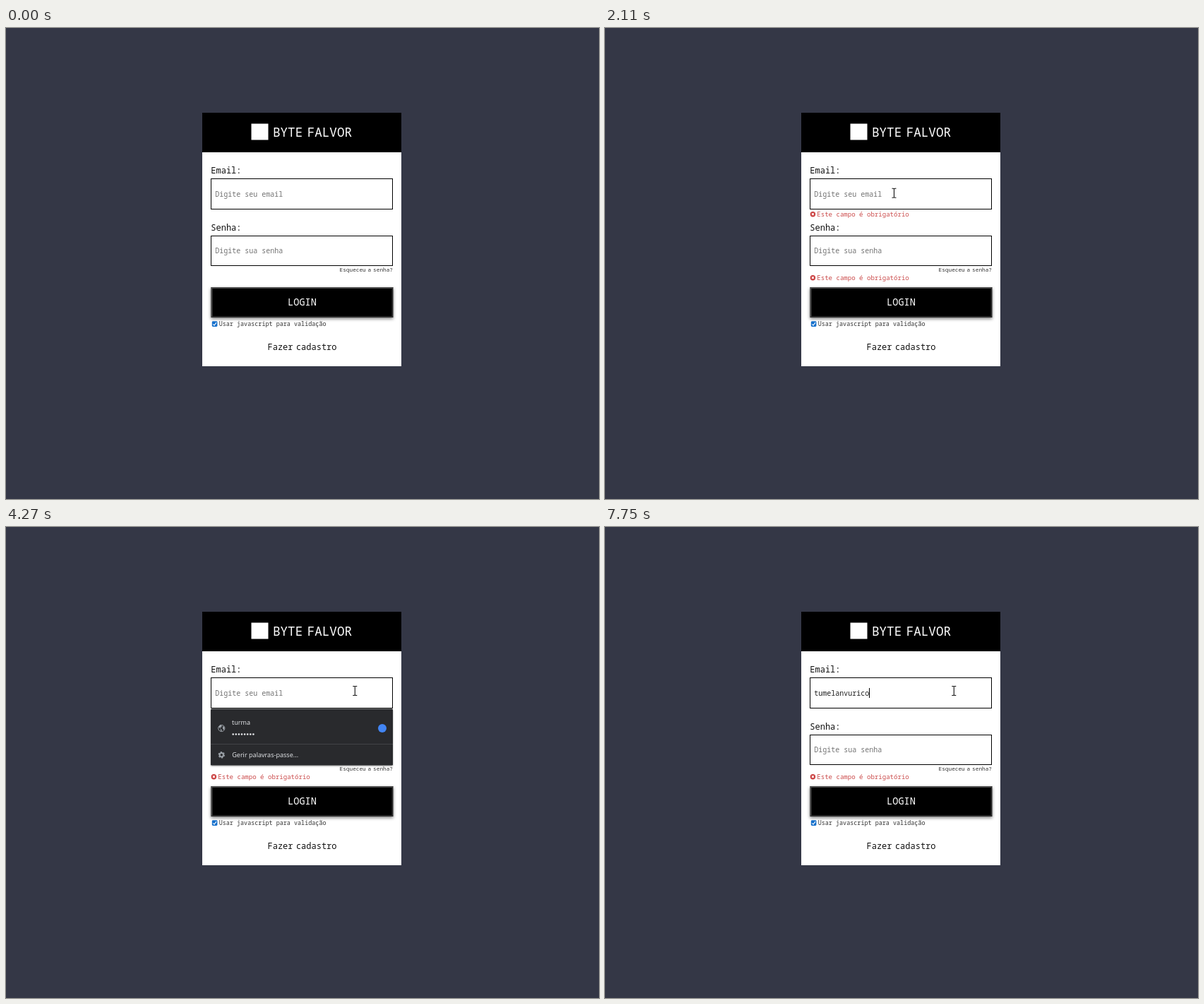
Write an HTML page that moves like this. It is 840 by 667 pixels and loops after 8000 ms.

```html
<!DOCTYPE html>
<html lang="pt">
<head>
<meta charset="utf-8">
<title>Login</title>
<style>
  html, body { margin: 0; width: 100%; height: 100%; overflow: hidden; background: #343746; }
  svg { display: block; width: 100%; height: 100%; }
  text { font-family: "Noto Sans Mono", "DejaVu Sans Mono", monospace; white-space: pre; }
  .label { font-size: 12px; fill: #111; }
  .hint { font-size: 10px; fill: #757575; }
  .error text { font-size: 9.07px; fill: #cb4b4b; }
  .field { fill: #fff; stroke: #000; }
  .popup { filter: drop-shadow(0 1.5px 1px rgba(0, 0, 0, .4)); }
  .popup text { font: 9.1px "Open Sans", "Noto Sans", sans-serif; fill: #e8eaed; }
  .popup .strong { font-weight: 600; }
  .button { filter: drop-shadow(0 2px 2px rgba(0, 0, 0, .5)); }
</style>
</head>
<body>
<svg viewBox="0 0 840 667">
  <defs>
    <g id="mark">
      <circle r="3.7" fill="#c93c3c"/>
      <path d="M-1.4-1.4 1.4 1.4M1.4-1.4-1.4 1.4" stroke="#fff" stroke-width="1.3"/>
    </g>
  </defs>
  <rect width="840" height="667" fill="#343746"/>
  <rect x="278" y="120" width="282" height="359" fill="#fff"/>
  <rect x="278" y="120" width="282" height="56" fill="#000"/>
  <rect x="347.5" y="135.5" width="24" height="23" fill="#fff"/>
  <text x="378" y="153.5" font-size="17.6" word-spacing="-4.1" fill="#fff">BYTE FALVOR</text>

  <text class="label" x="290.3" y="206">Email:</text>
  <rect id="email" class="field" x="290.5" y="213.5" width="257" height="43"/>
  <text id="value" class="hint" x="296.3" y="238.5"></text>
  <rect id="caret" y="228" width="1" height="14" fill="#000"/>

  <text class="label" x="290.3" y="286.5">Senha:</text>
  <rect class="field" x="290.5" y="294.5" width="257" height="42"/>
  <text class="hint" x="296.3" y="319">Digite sua senha</text>
  <text x="548" y="344.5" font-size="7.76" word-spacing="-1.8" fill="#333" text-anchor="end">Esqueceu a senha?</text>

  <g id="emailError" class="error">
    <use href="#mark" x="294.4" y="263.7"/>
    <text x="300.3" y="267">Este campo é obrigatório</text>
  </g>
  <g id="passError" class="error">
    <use href="#mark" x="294.4" y="353.7"/>
    <text x="300.3" y="357">Este campo é obrigatório</text>
  </g>

  <g class="button">
    <rect x="290.5" y="367" width="258" height="43" fill="#2b2b2b"/>
    <path d="M290.5 410V367H548.5L546.5 369H292.5V408Z" fill="#4d4d4d"/>
    <rect id="face" x="292.5" y="369" width="254" height="39"/>
  </g>
  <text x="419.5" y="393.3" font-size="13.6" fill="#fff" text-anchor="middle">LOGIN</text>

  <rect x="291.8" y="415.3" width="7.6" height="7.6" rx="1.4" fill="#1670cc"/>
  <path d="M293.3 419.3l1.7 1.8 3-3.9" fill="none" stroke="#fff" stroke-width="1.1"/>
  <text x="301.7" y="422" font-size="8.45" fill="#333">Usar javascript para validação</text>
  <text class="label" x="419.5" y="455.7" word-spacing="-2.8" text-anchor="middle">Fazer cadastro</text>

  <g id="accounts" class="popup">
    <rect x="290" y="257.5" width="258" height="80" rx="1.5" fill="#292a2d"/>
    <rect id="row" x="290" y="258" width="258" height="49" fill="#3f4042"/>
    <path d="M290 307.5H548" stroke="#424347"/>
    <circle cx="305.3" cy="285" r="4.6" fill="none" stroke="#9aa0a6"/>
    <path d="M301 283l3 3v3l1.5.5v-2.300l-2.500-3 2.500-1v-2.500l-2-.7zM307 282l2.500 1.500-.5 4-2-1.500z" fill="#9aa0a6"/>
    <text x="320" y="280.3">turma</text>
    <path d="M321.700 293.500h31" stroke="#e8eaed" stroke-width="2.700" stroke-linecap="round" stroke-dasharray="0 4.100"/>
    <circle cx="533" cy="285" r="6" fill="#4285f4"/>
    <circle cx="305.3" cy="322.700" r="2.700" fill="none" stroke="#9aa0a6" stroke-width="2"/>
    <circle cx="305.3" cy="322.700" r="4.100" fill="none" stroke="#9aa0a6" stroke-width="1.300" stroke-dasharray="2.300 1.990"/>
    <text x="320.2" y="326">Gerir palavras-passe...</text>
  </g>
  <g id="suggestion" class="popup">
    <rect x="290" y="257.5" width="258" height="38.5" rx="1.5" fill="#292a2d"/>
    <text class="strong" x="299.3" y="280.2">tumelandobresi@demo.test</text>
  </g>

  <g id="cursor">
    <path id="arrow" d="M0 .3V12.200L2.700 9.700 4.700 14.300 6.600 13.500 4.700 9H8.500Z" fill="#fff" stroke="#000" stroke-width=".8"/>
    <path id="beam" d="M-3-6.500H-1L0-6 1-6.500H3M0-6V6M-3 6.500H-1L0 6 1 6.500H3" fill="none" stroke="#111" stroke-width="1.100"/>
    <path id="hand" d="M-1 1Q0-.6 1 1V5.500L6 6.500Q8 7 7.600 9L6.500 15H0L-4 9.500Q-4.300 7.500-2.500 8.200L-1 9.500Z" fill="#fff" stroke="#000" stroke-width=".8"/>
  </g>
</svg>
<script>
const LOOP = 8000, BLINK = 528;
const LOGIN_CLICK = 1100, FOCUS = 2310, PREVIEW_ON = 3260, PREVIEW_OFF = 3600;
const typed = "tumelanvurico";
const keyTimes = [4330, 4600, 4690, 4790, 4920, 5050, 5130, 5930, 6020, 6290, 6490, 6630, 6690];

// Pointer stops: time, x, y
const path = [
  [120, 767, 645], [260, 650, 545], [450, 515, 450], [650, 445, 405], [880, 420, 392],
  [1100, 414, 390], [1240, 414, 390], [1500, 414, 390], [1570, 390, 345], [1640, 347, 290],
  [1710, 328, 264], [1770, 328, 264], [1900, 348, 236], [2050, 396, 230], [2240, 438, 241.5],
  [2710, 438, 241.5], [3100, 494, 249], [3170, 496.5, 251.5], [3240, 496.5, 251.5],
  [3350, 502, 273], [3500, 501, 270], [3600, 496, 250], [3660, 494.3, 232]
];

const $ = id => document.getElementById(id);
const show = (id, on) => { $(id).style.display = on ? "" : "none"; };
const clamp = v => Math.max(0, Math.min(1, v));
const ramp = (t, start, length) => clamp((t - start) / length);

function pointerAt(t) {
  const i = path.findIndex(stop => stop[0] > t);
  if (i < 0) return path[path.length - 1].slice(1);
  const [t0, x0, y0] = path[Math.max(0, i - 1)], [t1, x1, y1] = path[i];
  const p = ramp(t, t0, t1 - t0 || 1);
  return [x0 + (x1 - x0) * p, y0 + (y1 - y0) * p];
}

function setPopup(id, alpha, cy) {
  const scale = 0.95 + 0.05 * alpha;
  show(id, alpha > 0);
  $(id).style.opacity = alpha;
  $(id).setAttribute("transform", `translate(419 ${cy}) scale(${scale}) translate(-419 ${-cy})`);
}

function drawPointer(t, popupOpen) {
  const [x, y] = pointerAt(t);
  const inside = (top, bottom) => x > 290 && x < 548 && y > top && y < bottom;
  const onButton = inside(367, 410);
  const onField = inside(213, 257) || (!popupOpen && inside(294, 337));
  show("cursor", t >= 120);
  show("hand", onButton);
  show("beam", onField);
  show("arrow", !onButton && !onField);
  $("cursor").setAttribute("transform", `translate(${x} ${y})`);
  $("face").setAttribute("fill", onButton && t >= 120 ? "#222" : "#000");
}

function draw(t) {
  const count = keyTimes.filter(k => k <= t).length;
  const preview = t >= PREVIEW_ON && t < PREVIEW_OFF;
  const value = $("value");
  value.textContent = preview ? "turma" : count ? typed.slice(0, count) : "Digite seu email";
  value.style.fill = count ? "#222" : "#757575";
  $("email").style.fill = preview ? "#e8f0fe" : "#fff";
  show("row", preview);

  const lastReset = [FOCUS, 3660, ...keyTimes].filter(k => k <= t).pop();
  const caretOn = lastReset !== undefined && !preview && Math.floor((t - lastReset) / BLINK) % 2 === 0;
  show("caret", caretOn);
  $("caret").setAttribute("x", 296 + 6 * count);

  show("emailError", t >= LOGIN_CLICK && !count);
  show("passError", t >= LOGIN_CLICK);

  setPopup("accounts", ramp(t, FOCUS, 140) * (1 - ramp(t, 4330, 110)), 298);
  setPopup("suggestion", ramp(t, 4340, 120) * (1 - ramp(t, 5930, 172)), 277);
  drawPointer(t, t > FOCUS && t < 4440);
}

const start = performance.now();
function tick() {
  draw((performance.now() - start) % LOOP);
  requestAnimationFrame(tick);
}
tick();
</script>
</body>
</html>
```
